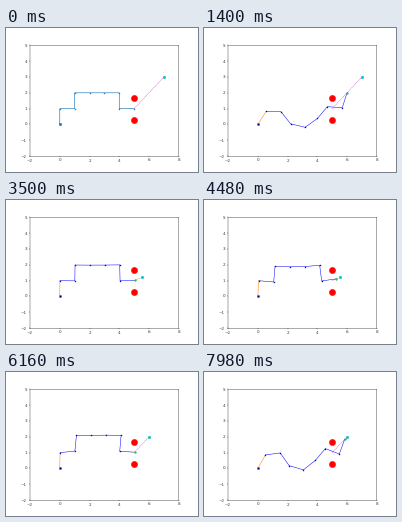
These frames come from a looping animation (192 px wide and 144 px high, 8 s). A matplotlib script:

```python
import numpy as np
import matplotlib.pyplot as plt
from matplotlib.animation import FuncAnimation

plt.rcParams.update({"path.snap": False, "text.hinting": "none"})

TICK, HOLD, STEPS, FRAMES = 20, 7, 20, 400
LINKS = 8
START = np.array([5.0, 1.0])

# Key poses as link headings in degrees: folded, opening, wavy, stretched
HOME = (90, 0, 90, 0, 0, 0, -90, 0)
FOLD = (50, 65, -23, -7, 38, 22, -106, 12)
WAVE = (60, 0, -52, -13, 35, 48, -10, 69)
STRETCH = 10 + np.arange(LINKS) ** 2
REACH = [HOME, FOLD, WAVE, STRETCH]
KNOTS = [0, 0.6, 1.3, 2.8]  # tip travel at each key pose

RUNS = [((7, 3), REACH), ((5.5, 1.2), [HOME]), ((6, 2), REACH)]


def ease(u):
    return u * u * (3 - 2 * u)


def solve(a, tip):
    """Turn the joints as little as possible so the tip is reached."""
    turn = np.tri(LINKS)
    for _ in range(8):
        err = tip - [np.cos(a).sum(), np.sin(a).sum()]
        jac = np.array([-np.sin(a), np.cos(a)]) @ turn
        a = a + turn @ np.linalg.pinv(jac) @ err
    return a


def chain(run, step):
    goal, poses = RUNS[run]
    move = (np.array(goal) - START) * ease(step / STEPS)
    knots = KNOTS[:len(poses)]
    a = np.radians([np.interp(np.hypot(*move), knots, h) for h in zip(*poses)])
    a = solve(a, START + move)
    links = np.column_stack([np.cos(a), np.sin(a)])
    return np.vstack([[0, 0], links.cumsum(axis=0)])


fig, ax = plt.subplots(figsize=(6.4, 4.8), dpi=30)
ax.set(xlim=(-2, 8), ylim=(-2, 5))
ax.tick_params(labelcolor="0.25")
ax.plot([5, 5], [0.3, 1.7], "ro", ms=15)

path, = ax.plot([], [], "m--", lw=0.8)
goal, = ax.plot([], [], "co", ms=6)
base, = ax.plot([0], [0], "o", color="C0", ms=6)
first, = ax.plot([], [], "-", color="C1", lw=1.2)
arm, = ax.plot([], [], "-", lw=1.2)
joints, = ax.plot([], [], "o", ms=2.5)
hand, = ax.plot([], [], "o", color="limegreen", ms=4)


def update(i):
    run, step = divmod(i // HOLD, STEPS + 1)
    moving = step > 0
    p = chain(run, step)
    path.set_data(*zip(START, RUNS[run][0]))
    goal.set_data(*zip(RUNS[run][0]))
    first.set_data(*p[:2].T)
    arm.set_data(*p[int(moving):].T)
    arm.set(color="b" if moving else "C0", lw=1.2 if moving else 1.5)
    joints.set_data(*p.T)
    joints.set_color("navy" if moving else "C0")
    hand.set_data(*p[-1:].T)
    first.set_visible(moving)
    hand.set_visible(moving)
    return path, goal, first, arm, joints, hand


anim = FuncAnimation(fig, update, frames=FRAMES, interval=TICK,
                     repeat=True, repeat_delay=0)
plt.show()
```
